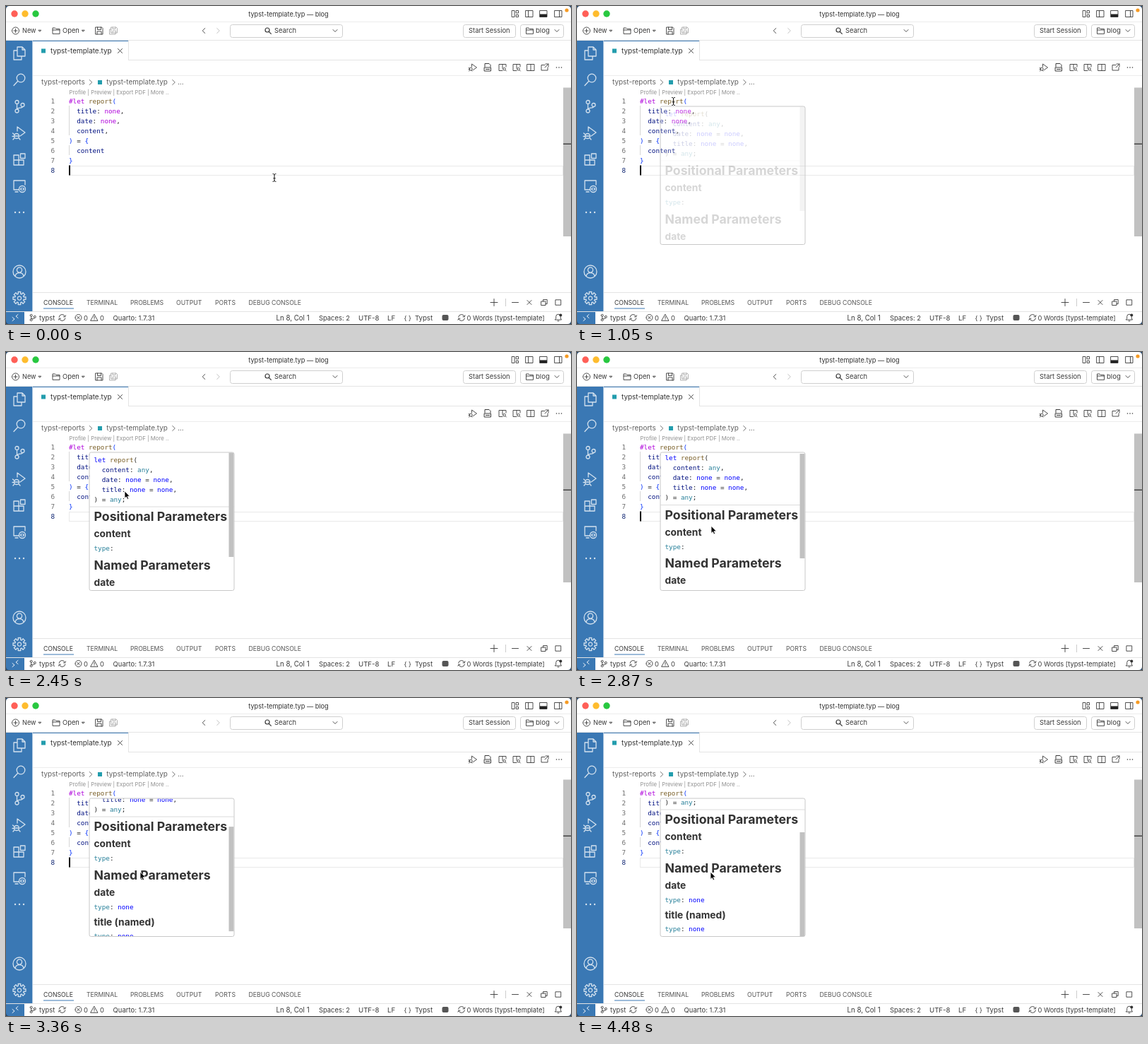
An HTML page that plays this animation: 800x450 px, repeating every 4.76 s.

```html
<!DOCTYPE html>
<html lang="en">
<head>
<meta charset="utf-8">
<title>Editor hover</title>
<style>
html, body { margin: 0; width: 100%; height: 100%; overflow: hidden; background: #fff; }
svg { display: block; width: 800px; height: 450px; }
text { white-space: pre; font-family: Inter, "Open Sans", sans-serif; font-optical-sizing: none; }
.mono { font-family: "DejaVu Sans Mono", "Liberation Mono", monospace; font-size: 9.3px; }
.h { font-weight: 700; fill: #333; }
path { stroke-linecap: round; stroke-linejoin: round; }
</style>
</head>
<body>
<svg id="stage" viewBox="0 0 800 450" xmlns="http://www.w3.org/2000/svg"></svg>
<script>
const LOOP = 4760, STEP = 70;
const BLUE = '#3a78b4', INK = '#3b3b3b', EDGE = '#e4e4e4';

const rect = (x, y, w, h, fill, more = '') =>
  `<rect x="${x}" y="${y}" width="${w}" height="${h}" fill="${fill}" ${more}/>`;
const box = (x, y, w, h, stroke = '#cfcfcf', r = 3) =>
  rect(x + .5, y + .5, w, h, '#fff', `rx="${r}" stroke="${stroke}"`);
const dot = (x, y, r, fill) => `<circle cx="${x}" cy="${y}" r="${r}" fill="${fill}"/>`;
const text = (x, y, s, size = 9.4, fill = INK, more = '') =>
  `<text x="${x}" y="${y}" font-size="${size}" fill="${fill}" ${more}>${s}</text>`;
const icon = (x, y, d, color = INK, w = .9) =>
  `<path transform="translate(${x} ${y})" d="${d}" fill="none" stroke="${color}" stroke-width="${w}"/>`;
const ring = (x, y, r) => `M${x - r} ${y}a${r} ${r} 0 1 0 ${2 * r} 0a${r} ${r} 0 1 0 ${-2 * r} 0`;

// Syntax colours, written as "k:text" pieces
const HUE = { k: '#af00db', f: '#795e26', v: '#001080', b: '#0431fa', p: '#222', n: '#0000ff', t: '#267f99' };
const code = (x, y, ...parts) => `<text class="mono" x="${x}" y="${y}">` +
  parts.map(p => `<tspan fill="${HUE[p[0]]}">${p.slice(2)}</tspan>`).join('') + '</text>';

const D = {
  down: 'M-3 -1.5L0 1.5L3 -1.5',
  drop: 'M-1.7 -.8H1.7L0 1Z',
  left: 'M1.8 -3.5L-1.8 0L1.8 3.5',
  right: 'M-1.8 -3.5L1.8 0L-1.8 3.5',
  cross: 'M-3 -3L3 3M3 -3L-3 3',
  folder: 'M-5 4V-4H-1.5L0 -2.5H5V4ZM-5 -1H5',
  save: 'M-5 -5H3.5L5 -3.5V5H-5ZM-2.5 -5V-1.5H2.5V-5M-3 5V1H3V5',
  saveAll: 'M-3 -5H4L5.5 -3.5V3H-3ZM-1 -5V-2.5H3V-5M-3 -2H-5.5V5H3V3M-1 3V0H3.5V3',
  frame: 'M-5 -4.5H5V4.5H-5Z',
  sync: 'M-4.4 -.8A4.4 4.4 0 0 1 4 -1.8M4.4 .8A4.4 4.4 0 0 1 -4 1.8M2 -1.2L4.2 -1.2L5 -3.2M-2 1.2L-4.2 1.2L-5 3.2',
  branch: ring(-2.3, -3.2, 1.5) + ring(-2.3, 3.2, 1.5) + ring(2.8, -1.2, 1.5) +
    'M-2.3 -1.7V1.7M2.8 .3C2.8 2 -.5 1 -1.8 1.8',
  run: 'M-1.5 -1V-5L5.5 0L.5 3.5' + ring(-2.8, 2.2, 2) + 'M-5.8 .5L-4.6 1M-6 2.6H-4.8M-5.6 5L-4.3 3.8M-1 5L-1.6 3.8'
};

function chrome() {
  let s = rect(0, 0, 800, 450, '#fff');
  // Title bar
  ['#ff5f57', '#febc2e', '#28c840'].forEach((c, i) => s += dot(12 + 15 * i, 11, 4.7, c));
  s += text(400, 14.5, 'typst-template.typ — blog', 9.2, '#333', 'text-anchor="middle"');
  s += icon(721, 11, 'M-4.5 -4.5H-1V4.5H-4.5ZM1.5 -4.5H4.5V-1H1.5ZM1.5 1.5H4.5V4.5H1.5Z');
  [741, 761, 782].forEach(x => s += icon(x, 11, D.frame));
  s += icon(741, 11, 'M-1.5 -4.5V4.5') + rect(756, 11.5, 10, 4, '#222') + icon(782, 11, 'M1.5 -4.5V4.5');
  s += dot(794, 6, 2.6, '#f59a23');
  s += rect(0, 22, 800, 1, '#ececec');
  // Toolbar
  s += icon(13.5, 35, ring(0, 0, 5) + 'M-2.5 0H2.5M0 -2.5V2.5') + text(23, 38.4, 'New', 9.2) + icon(48, 35, D.drop);
  s += icon(71, 35, D.folder) + text(80, 38.4, 'Open') + icon(109.5, 35, D.drop);
  s += icon(132, 35, D.save) + icon(152, 35, D.saveAll, '#aaa');
  s += icon(280, 35, D.left) + icon(300.5, 35, D.right, '#bbb');
  s += box(317, 26, 159, 18) + icon(371, 35, ring(-1, -1, 3) + 'M1.3 1.3L4.3 4.3', '#333', 1.2);
  s += text(380, 38.4, 'Search') + icon(466, 35, D.down);
  s += box(647, 26, 74, 18) + text(655, 38.4, 'Start Session');
  s += box(728, 26, 61, 18) + icon(741.5, 35, D.folder) + text(750, 38.4, 'blog', 9.6) + icon(780, 35, D.down);
  s += rect(0, 48, 800, 1, EDGE);
  // Tab and editor actions
  s += rect(38, 49, 135, 1, BLUE) + rect(173, 49, 1, 28, EDGE) + rect(173, 76, 627, 1, EDGE);
  s += rect(50, 60.5, 6, 6, '#239dad') + text(63, 67, 'typst-template.typ', 9.95, '#333') + icon(161.5, 63.5, D.cross, '#333');
  s += icon(661, 87, D.run);
  s += icon(682, 87, 'M-4 -1V-5.5H2L4 -3.5V-1M-4.5 0H4.5V5H-4.5ZM-2.5 2.5H2.5', INK, 1);
  [703, 723].forEach(x => s += icon(x, 87, 'M5 -1V-4.5H-5V4.5H0M0 -4.5V1' + ring(2.5, 2.2, 1.8) + 'M3.8 3.5L5.3 5'));
  s += icon(743, 87, D.frame + 'M0 -4.5V4.5');
  s += icon(763, 87, 'M0 -3.5H-5V4H4V0M1 -5H5V-1M5 -5L0 0');
  [-3.5, 0, 3.5].forEach(d => s += dot(783 + d, 87, .8, INK));
  s += rect(38, 98, 762, 1, '#ededed');
  // Breadcrumbs
  s += text(50, 111.3, 'typst-reports', 9.95, '#616161') + icon(120, 108, D.right, '#616161');
  s += rect(130, 105, 6, 6, '#239dad') + text(142.3, 111.3, 'typst-template.typ', 9.95, '#616161');
  s += icon(237.5, 108, D.right, '#616161') + text(243, 111.3, '...', 9.95, '#616161');
  return s;
}

function editor() {
  let s = text(89.5, 124.6, 'Profile | Preview | Export PDF | More ..', 7.8, '#919191');
  const lines = [
    ['k:#let ', 'f:report', 'b:('],
    ['v:  title', 'p:: ', 'k:none', 'p:,'],
    ['v:  date', 'p:: ', 'k:none', 'p:,'],
    ['v:  content', 'p:,'],
    ['b:)', 'p: = ', 'b:{'],
    ['v:  content'],
    ['b:}'], []
  ];
  s += rect(89.5, 226.5, 699, 13, 'none', 'stroke="#e9e9e9"');
  s += rect(89, 141, 1, 42, '#d6d6d6') + rect(89, 197, 1, 14, '#d6d6d6');
  lines.forEach((l, i) => {
    const y = 137.5 + 14 * i;
    s += `<text class="mono" x="69" y="${y}" text-anchor="end" fill="${i === 7 ? '#0b216f' : '#6e6e6e'}">${i + 1}</text>`;
    s += code(89, y, ...l);
  });
  s += rect(89, 225.5, 2, 14, '#000', 'id="caret"');
  s += rect(789, 115.5, 11, 210.5, '#c1c1c1') + rect(789, 194.5, 11, 1.5, '#444');
  return s;
}

function sidebar() {
  const c = '#d3e1ee', at = (y, d) => icon(19, y, d, c, 1.3);
  let s = rect(0, 49, 37.4, 384, BLUE);
  s += at(67, 'M-3 -9H4L8 -5V4H-3ZM4 -9V-5H8M-3 -4H-8V9H3V4');
  s += at(104, ring(2, -2, 5.8) + 'M-2.2 2.2L-8 8.5');
  s += at(142, ring(-3.5, -6, 2.5) + ring(-3.5, 6.5, 2.5) + ring(4.5, -2, 2.5) + 'M-3.5 -3.5V4M4.5 .5C4.5 3 -2 1 -3.5 4');
  s += at(180, 'M-3 -3V-9L8 -1L1 4' + ring(-4, 4, 3.5) + 'M-9.5 0L-7 2M-10 4.5H-7.5M-9 9L-6.8 6.5M1 9L-1.2 6.5M-7.5 4H-.5');
  s += at(217, 'M-8 -6H-1V8H-8ZM-8 1H6V8H-1M1.5 -8H8V-1.5H1.5ZM6 1V8');
  s += at(255, 'M-1 5H-8V-8H8V-2M-6 8H-2' + ring(4, 4, 4.5) + 'M3 2.5L1.5 4L3 5.5M5 2.5L6.5 4L5 5.5');
  [-6, 0, 6].forEach(d => s += dot(19 + d, 292, 1.2, c));
  s += at(376, ring(0, 0, 9) + ring(0, -2.5, 3.6) + 'M-6 6.5C-5 0 5 0 6 6.5');
  let teeth = '';
  for (let i = 0; i < 8; i++) {
    const p = (r, a) => (r * Math.cos(a)).toFixed(1) + ' ' + (r * Math.sin(a)).toFixed(1);
    const a = i * Math.PI / 4;
    teeth += `${i ? 'L' : 'M'}${p(6.3, a - .28)}L${p(9.2, a - .2)}L${p(9.2, a + .2)}L${p(6.3, a + .28)}`;
  }
  return s + at(413.5, teeth + 'Z' + ring(0, 0, 2.6));
}

function panel() {
  let s = rect(38, 405, 762, 1, EDGE);
  [[53, 'CONSOLE'], [114, 'TERMINAL'], [176, 'PROBLEMS'], [241, 'OUTPUT'], [296, 'PORTS'], [343.5, 'DEBUG CONSOLE']]
    .forEach(([x, t], i) => s += text(x, 422.7, t, 8.7, i ? '#555' : '#333'));
  s += rect(53, 427.5, 43, 1, BLUE);
  s += icon(691, 419.5, 'M-5 0H5M0 -5V5') + rect(707, 414, 1, 11, '#ccc') + icon(721, 419.5, 'M-4.5 0H4.5');
  s += icon(741, 419.5, D.cross) + icon(762, 419.5, 'M-4 -1.5H2V4H-4ZM-1.5 -1.5V-4H4.2V2H2') + icon(782, 419.5, 'M-3.7 -3.7H3.7V3.7H-3.7Z');
  // Status bar
  s += rect(0, 432, 800, 1, EDGE) + rect(0, 433, 26, 17, BLUE);
  s += icon(13, 441, 'M-4 -.5L-1 2L-4 4.5M4 -4.5L1 -2L4 .5', '#fff');
  s += icon(38, 441, D.branch) + icon(79.5, 441, D.sync) + icon(645, 441, D.sync);
  s += icon(102.5, 441, ring(0, 0, 4.5) + 'M-1.7 -1.7L1.7 1.7M1.7 -1.7L-1.7 1.7');
  s += icon(125, 441, 'M0 -4.5L5 4.3H-5ZM0 -1.5V1.2M0 2.8V2.9');
  [[47, 'typst'], [110, '0'], [133, '0'], [151.5, 'Quarto: 1.7.31', 9.5], [382.5, 'Ln 8, Col 1', 9.7], [443, 'Spaces: 2'],
   [499, 'UTF-8', 9.6], [540, 'LF', 9.6], [563.5, '{ }', 9.2], [579, 'Typst', 9.6], [652.5, '0 Words [typst-template]', 9.3]]
    .forEach(([x, t, size]) => s += text(x, 444.6, t, size));
  s += rect(617.5, 437, 9, 8, '#555', 'rx="2"');
  s += icon(782, 441, 'M-4.5 3H4.5L3.3 1V-1.5A3.3 3.3 0 0 0 -3.3 -1.5V1ZM-1 4.8H1') + dot(785.3, 437.6, 2, '#333');
  return s;
}

function popup() {
  const typed = (y, ...more) => code(124.5, y, 't:type', 'p::', ...more);
  const heading = (y, t, size) => text(124.5, y, t, size, '#333', 'class="h"');
  const entry = (name, last) => ['v:  ' + name, 'p:: ', ...last];
  const none = ['n:none', 'p: = ', 'n:none', 'p:,'];
  let s = '';
  [['n:let ', 'f:report', 'p:('], entry('content', ['t:any', 'p:,']), entry('date', none), entry('title', none),
   ['p:) = ', 't:any', 'p:;']].forEach((l, i) => s += code(124.5, 155.8 + 14 * i, ...l));
  s += rect(118, 218.5, 205, 1, '#dcdcdc');
  s += heading(239.2, 'Positional Parameters', 17.7) + heading(262.2, 'content', 13.8) + typed(281);
  s += heading(307.8, 'Named Parameters', 17.7) + heading(330.8, 'date', 13.8) + typed(349.5, 'p: ', 'n:none');
  s += heading(373, 'title (named)', 13.8) + typed(391, 'p: ', 'n:none');
  return `<clipPath id="clip"><rect x="118.5" y="142.5" width="204" height="195" rx="2"/></clipPath>
    <g id="popup"><g id="fade" clip-path="url(#clip)">${rect(118, 142, 205, 196, '#fff')}
    <g id="body">${s}</g>${rect(315.5, 142, 7.5, 148, '#c1c1c1', 'id="thumb"')}</g>
    ${rect(118, 142, 205, 195.5, 'none', 'rx="2.5" stroke="#c8c8c8"')}</g>`;
}

const beam = 'M-2 -5.5C-.6 -5.5 0 -5 0 -4V4C0 5 -.6 5.5 -2 5.5M2 -5.5C.6 -5.5 0 -5 0 -4M2 5.5C.6 5.5 0 5 0 4M-1.2 .8H1.2';
const pointers = `<g id="beam">${icon(0, 0, beam, '#fff', 2.4)}${icon(0, 0, beam, '#111', 1)}</g>
  <path id="arrow" d="M0 0V10L2.3 7.9L3.9 11.4L5.6 10.6L4.1 7.2H7.2Z" fill="#000" stroke="#fff" stroke-width=".8"/>`;
const corners = '<path fill="#24476d" fill-rule="evenodd" d="M0 0H800V450H0ZM5 0Q0 0 0 5V445Q0 450 5 450H795Q800 450 800 445V5Q800 0 795 0Z"/>';

const $ = id => document.getElementById(id);
$('stage').innerHTML = chrome() + editor() + sidebar() + panel() + popup() + corners + pointers;

// Tracks: [time, value...], linear between entries
const MOUSE = [[0, 380, 243], [140, 369, 239], [280, 330, 224], [420, 262, 194], [560, 190, 161], [700, 149, 141],
  [910, 136.5, 135], [1610, 136.5, 135], [1890, 138, 138], [2100, 144, 150], [2310, 156, 175], [2450, 168, 197],
  [2590, 183, 232], [2660, 190, 246.5], [4060, 190, 246.5], [4200, 189, 246.5]];
const SCROLL = [[2800, 0], [2940, 5], [3150, 25], [3360, 51], [3430, 58], [3500, 61]];
const FADE = [[980, 0], [1050, .2], [1330, 1]];
const BLINK = [280, 770, 1330, 1820, 2380, 2870, 3430, 3920, 4480];

function at(track, t) {
  const i = track.findIndex(k => k[0] > t);
  if (i === 0) return track[0].slice(1);
  if (i < 0) return track[track.length - 1].slice(1);
  const a = track[i - 1], b = track[i], u = (t - a[0]) / (b[0] - a[0]);
  return a.slice(1).map((v, j) => v + (b[j + 1] - v) * u);
}
const show = (id, on) => $(id).style.display = on ? '' : 'none';

function draw(t) {
  const [x, y] = at(MOUSE, t), [scroll] = at(SCROLL, t), [alpha] = at(FADE, t);
  const hover = t > 1330 && y > 142;
  show('beam', !hover);
  show('arrow', hover);
  $(hover ? 'arrow' : 'beam').setAttribute('transform', `translate(${x} ${y})`);
  show('caret', BLINK.filter(b => b <= t).length % 2 === 0);
  show('popup', alpha > 0);
  $('fade').setAttribute('opacity', alpha);
  $('body').setAttribute('transform', `translate(0 ${-scroll})`);
  $('thumb').setAttribute('y', 142 + scroll * 48 / 61);
}

const start = performance.now();
function tick() {
  const t = (performance.now() - start) % LOOP;
  draw(Math.floor(t / STEP) * STEP);
  requestAnimationFrame(tick);
}
tick();
</script>
</body>
</html>
```
